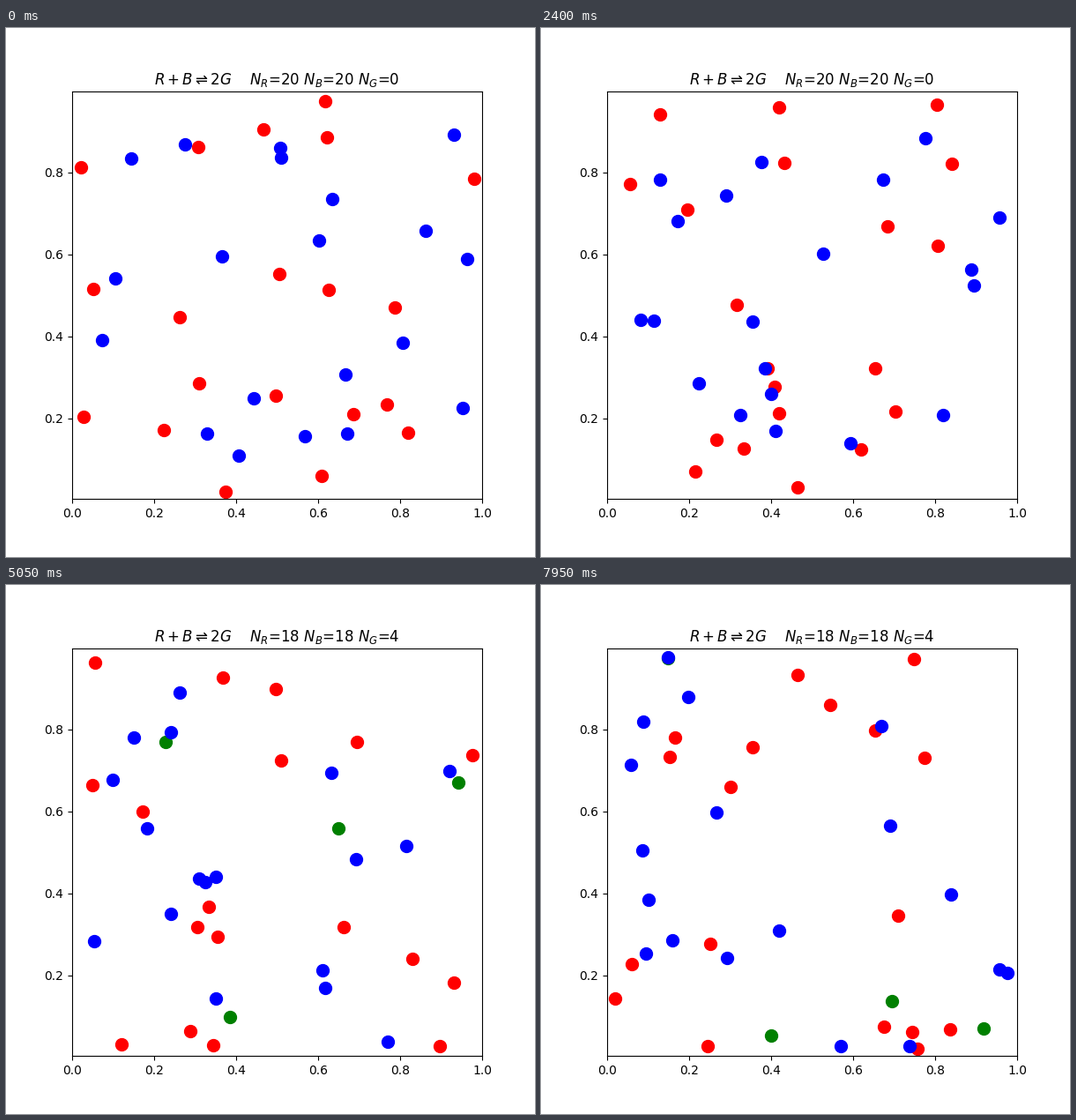
These frames come from a looping animation (600x600 px, 8 s). A matplotlib script:

```python
import numpy as np
import matplotlib.pyplot as plt
from matplotlib.animation import FuncAnimation

FRAMES, STEP = 160, 50
PER_COLOUR = 20
EDGE = 0.016                         # walls as felt by a dot's centre
SPEED, KEEP = 0.005, 0.95            # drift per frame and its persistence

# Each red-blue pair meets at one point, then leaves it as two green dots.
# Per pair: meeting frame, meeting point, the two green routes.
ROUTE_TIMES = (69, 101, 134, 159)
REACTIONS = [
    (52, (0.39, 0.315),
     [(0.366, 0.234), (0.385, 0.098), (0.397, 0.098), (0.400, 0.052)],
     [(0.327, 0.512), (0.229, 0.769), (0.176, 0.872), (0.148, 0.974)]),
    (66, (0.84, 0.905),
     [(0.843, 0.918), (0.943, 0.669), (0.927, 0.256), (0.918, 0.069)],
     [(0.834, 0.901), (0.650, 0.557), (0.663, 0.174), (0.695, 0.137)]),
]


def wander(count, seed=7):
    """Random starts and slowly turning velocities, folded at the walls."""
    rng = np.random.default_rng(seed)
    pos = rng.uniform(EDGE, 1 - EDGE, (count, 2))
    vel = rng.normal(0, SPEED, (count, 2))
    out = []
    for _ in range(FRAMES):
        out.append(pos)
        kick = rng.normal(0, SPEED, (count, 2))
        vel = KEEP * vel + np.sqrt(1 - KEEP ** 2) * kick
        pos = pos + vel
    span = 1 - 2 * EDGE
    folded = np.mod(np.array(out) - EDGE, 2 * span)
    return EDGE + np.minimum(folded, 2 * span - folded)


def steer(path, when, meet, route):
    """Ease a path into the meeting point, then follow the green route."""
    t = np.arange(FRAMES)
    u = np.clip(t / when, 0, 1)
    ease = (u * u * (3 - 2 * u))[:, None]
    before = path * (1 - ease) + np.array(meet) * ease
    times = (when,) + ROUTE_TIMES
    points = np.array([meet] + route)
    after = np.column_stack([np.interp(t, times, p) for p in points.T])
    return np.where(t[:, None] < when, before, after)


paths = wander(2 * PER_COLOUR)
for k, (when, meet, *routes) in enumerate(REACTIONS):
    for i, route in zip((k, PER_COLOUR + k), routes):
        paths[:, i] = steer(paths[:, i], when, meet, route)

fig, ax = plt.subplots(figsize=(6, 6), dpi=100)
ax.set(xlim=(0, 1), ylim=(0, 1))
ax.set_aspect("equal", adjustable="datalim")
title = ax.set_title("")
dots = {c: ax.plot([], [], "o", color=c, ms=10)[0]
        for c in ("red", "green", "blue")}


def draw(n):
    done = sum(n >= when for when, *_ in REACTIONS)
    red, blue = paths[n, :PER_COLOUR], paths[n, PER_COLOUR:]
    groups = {"red": red[done:], "blue": blue[done:],
              "green": np.vstack([red[:done], blue[:done]])}
    for c, pts in groups.items():
        dots[c].set_data(*pts.T)
    left = PER_COLOUR - done
    title.set_text(r"$R+B \rightleftharpoons 2G$    "
                   f"$N_R$={left} $N_B$={left} $N_G$={2 * done}")
    return [title, *dots.values()]


anim = FuncAnimation(fig, draw, frames=FRAMES, interval=STEP,
                     init_func=lambda: draw(0), repeat=True, repeat_delay=0)
plt.show()
```
